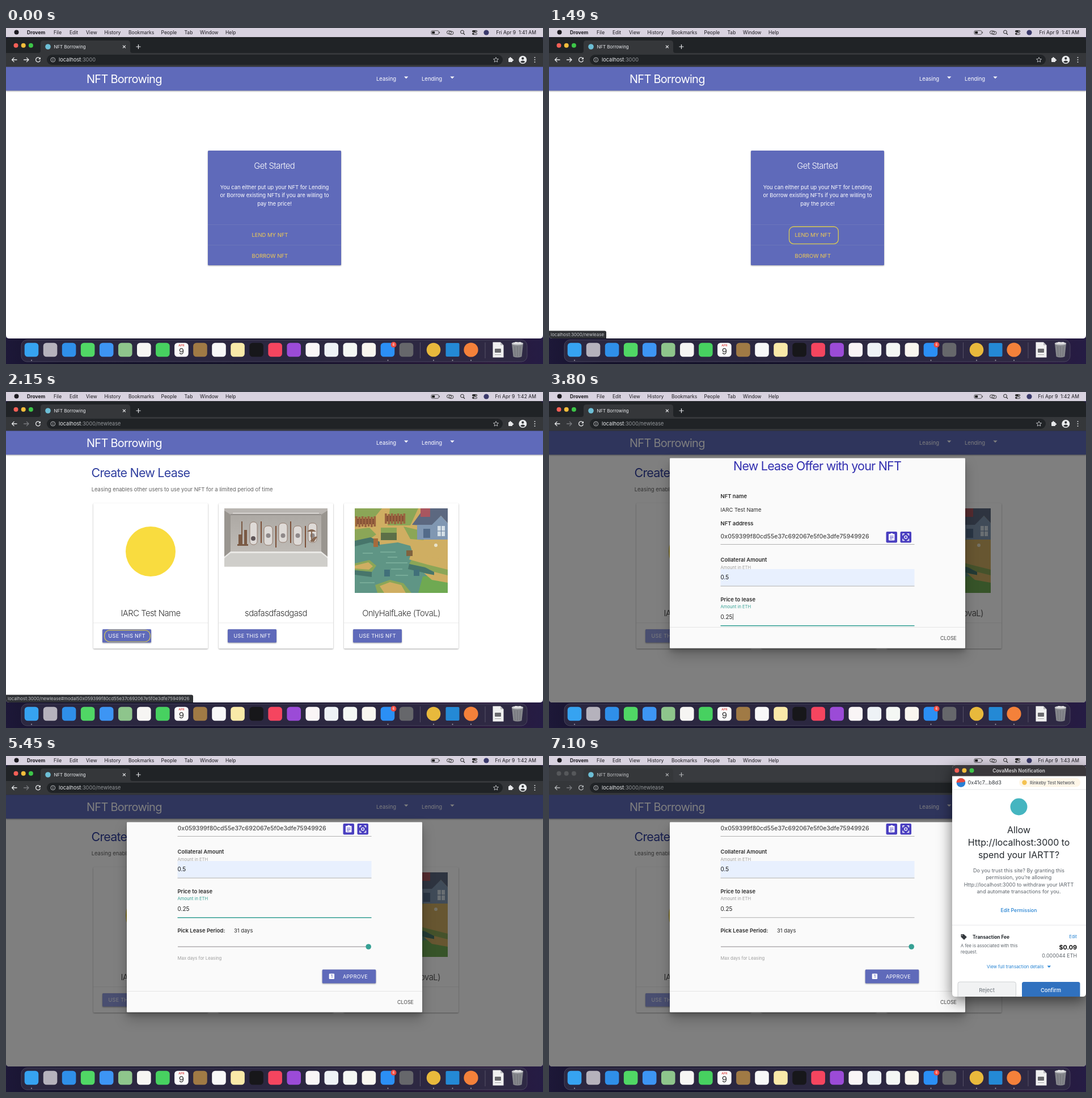
Animation, 947 px wide and 592 px high, one loop 8 s. Source, as an HTML page:

```html
<!DOCTYPE html>
<html lang="en">
<head>
<meta charset="utf-8">
<title>NFT Borrowing</title>
<style>
html, body { margin: 0; width: 100%; height: 100%; overflow: hidden; background: #120f26; }
svg { display: block; width: 947px; height: 592px; }
text { font-family: Inter, "Open Sans", sans-serif; white-space: pre; }
.lift { filter: drop-shadow(0 1px 1.2px rgba(0,0,0,.36)); }
.float { filter: drop-shadow(0 6px 3px rgba(0,0,0,.12)) drop-shadow(0 11px 11px rgba(0,0,0,.24)); }
.window { filter: drop-shadow(0 8px 13px rgba(0,0,0,.55)); }
</style>
</head>
<body>
<svg id="stage" viewBox="0 0 947 592"></svg>
<script>
const stage = document.getElementById('stage');
const INDIGO = '#5f6aba', YELLOW = '#f2cc52', RING = '#dacb50', TEAL = '#35a094', INK = '#2b2b2b';
const CUTS = [500, 2150, 3800, 5450, 7100], LOOP = 8000;
const TOKEN = '0x059399f80cd55e37c692067e5f0e3dfe75949926';

// y is the middle of the capitals
const text = (x, y, s, size, fill, more = '') =>
  `<text x="${x}" y="${y + size * .36}" font-size="${size}" fill="${fill}" ${more}>${s}</text>`;
const MID = 'text-anchor="middle" ', END = 'text-anchor="end" ', BOLD = 'font-weight="600"', MED = 'font-weight="500"';
const HEAD = 'letter-spacing="-.8"', SUB = 'letter-spacing="-.5" font-weight="300"';
const rect = (x, y, w, h, fill, r = 0, more = '') =>
  `<rect x="${x}" y="${y}" width="${w}" height="${h}" rx="${r}" fill="${fill}" ${more}/>`;
const dot = (x, y, r, fill, more = '') => `<circle cx="${x}" cy="${y}" r="${r}" fill="${fill}" ${more}/>`;
const path = (d, fill, more = '') => `<path d="${d}" fill="${fill}" ${more}/>`;
const line = (d, stroke, w = 1, more = '') => path(d, 'none', `stroke="${stroke}" stroke-width="${w}" ${more}`);
const group = (s, more = '') => `<g ${more}>${s}</g>`;
const lights = (x, y, gap, cols) => cols.map((c, i) => dot(x + i * gap, y, 4, c)).join('');
const LIGHTS = ['#f45f56', '#f6bd3b', '#3dc648'];

const DEFS = `<defs>
<linearGradient id="desk"><stop stop-color="#1d1838"/><stop offset=".1" stop-color="#14112a"/><stop offset=".5" stop-color="#15122b"/><stop offset=".9" stop-color="#2a1a3c"/><stop offset="1" stop-color="#251c44"/></linearGradient>
<linearGradient id="wall" x2="0" y2="1"><stop stop-color="#aaa6a1"/><stop offset="1" stop-color="#c6c2bd"/></linearGradient>
<clipPath id="page"><path d="M0 68H947V541Q947 547 941 547H6Q0 547 0 541Z"/></clipPath>
<clipPath id="scroll"><path d="M213 116.5H734V414H213Z"/></clipPath>
<clipPath id="art"><path d="M0 0H164V149H0Z"/></clipPath>
<clipPath id="pop"><path d="M711 22Q711 16 717 16H941Q947 16 947 22V418Q947 424 941 424H717Q711 424 711 418Z"/></clipPath>
<clipPath id="face"><circle cx="726.5" cy="47" r="8"/></clipPath>
</defs>`;

function menuBar(clock) {
  const items = [[84, 'File'], [112, 'Edit'], [141, 'View'], [173.5, 'History'], [216, 'Bookmarks'],
    [273.5, 'People'], [314.5, 'Tab'], [342, 'Window'], [387, 'Help']];
  return rect(0, 0, 947, 16, '#d8d2df') + dot(18.5, 7.5, 4, '#1c1a20')
    + text(37, 8, 'Drovem', 8.5, '#1c1a20', 'font-weight="700"')
    + items.map(([x, s]) => text(x, 8, s, 8.5, '#1c1a20')).join('')
    + rect(750, 4.7, 13, 6.6, 'none', 1.8, 'stroke="#333" stroke-width=".8"') + rect(751.2, 6, 5, 4, '#222', .8) + rect(764, 6.7, 1, 2.6, '#444')
    + rect(777.5, 5, 8, 5.4, 'none', 2.7, 'stroke="#333"') + rect(781, 6, 8, 5.4, 'none', 2.7, 'stroke="#333"')
    + dot(804.5, 7, 2.9, 'none', 'stroke="#222"') + line('M806.6 9.2L809 11.8', '#222', 1.2)
    + rect(822, 4, 9, 3.4, '#222', 1.7) + dot(828.8, 5.7, 1, '#d8d2df') + rect(822.4, 8.8, 8.2, 2.8, 'none', 1.4, 'stroke="#222" stroke-width=".8"') + dot(824, 10.2, 1.2, '#222')
    + dot(847, 8, 4.6, '#3b3a6c')
    + text(935, 8, `Fri Apr 9\u00a0 ${clock}`, 8.6, '#1c1a20', END);
}

function browser(url, forward, active) {
  const pale = active ? '#e6e7e9' : '#b4b6b9', arrow = 'stroke-linecap="round" stroke-linejoin="round"';
  return path('M0 68.3V22Q0 16 6 16H941Q947 16 947 22V68.3Z', active ? '#202326' : '#393b3f')
    + path('M57 44Q61 44 61 40V27Q61 22 66 22H214Q219 22 219 27V40Q219 44 223 44H947V68.3H0V44Z', '#35373a')
    + lights(17.5, 30.8, 13.2, active ? LIGHTS : Array(3).fill('#56585b'))
    + dot(74, 33, 4.8, '#6dbfd6') + text(84.5, 33, 'NFT Borrowing', 7.9, active ? '#e8eaed' : '#c2c4c7')
    + line('M206 30.6l4.8 4.8m0-4.8l-4.8 4.8', pale, 1.2) + line('M229.5 33h8m-4-4v8', pale, 1.2)
    + line('M19 56H10.5m3.6-3.6l-3.6 3.6 3.6 3.6', pale, 1.3, arrow)
    + line('M31.5 56H40m-3.6-3.6l3.6 3.6-3.6 3.6', forward ? pale : '#797b7f', 1.3, arrow)
    + line('M60 53.8A4 4 0 1 0 60.4 57', pale, 1.3) + path('M61 51.4v3.8h-3.8z', pale)
    + rect(72, 47, 804, 18, '#202326', 9)
    + dot(82.8, 56, 3.9, 'none', 'stroke="#c9cbce" stroke-width=".9"') + line('M82.8 55.4v2.8M82.8 53.6v1', '#c9cbce', 1)
    + text(93, 56, `localhost<tspan fill="#94979b">:3000${url}</tspan>`, 9.2, '#e8eaed')
    + path('M864 51.6l1.3 2.9 3.2.3-2.4 2.1.7 3.1-2.8-1.6-2.8 1.6.7-3.1-2.4-2.1 3.2-.3z', 'none', 'stroke="#c9cbce" stroke-width=".9"')
    + rect(886, 53, 7, 7, '#e6e7e9', 1) + dot(889.4, 52.8, 1.6, '#e6e7e9') + dot(893.4, 56.5, 1.6, '#e6e7e9')
    + dot(911.3, 56, 7, '#eceef0') + dot(911.3, 53.7, 2.1, '#35373a') + path('M907 59.4q4.3-4 8.6 0-4.3 4-8.6 0z', '#35373a')
    + [52, 56, 60].map(y => dot(932.5, y, 1, '#dcdddf')).join('');
}

function dock() {
  const cols = ['#36a3f1', '#b5b2bc', '#2f8fe9', '#50d765', '#3d95f4', '#8ec58c', '#f6f5f3', '#47d160', '#fafafa', '#a07a45',
    '#f8f8f8', '#f9e9a8', '#17171a', '#f5455f', '#9b4bd7', '#f9f5f6', '#eef2f6', '#f4f7f4', '#f9f6ef', '#2b8ff5', '#66676b'];
  const at = i => 45 + i * 33.05;
  return rect(27, 549.5, 892, 38.5, '#302d45', 10, 'fill-opacity=".82" stroke="#57536b" stroke-width=".7"')
    + cols.map((c, i) => rect(at(i) - 12.3, 554.7, 24.6, 24.6, c, 5.6)).join('')
    + text(at(8), 559, 'APR', 5, '#dc4a45', MID + BOLD) + text(at(8), 569.5, '9', 15, '#333', MID)
    + dot(683.5, 558, 5, '#ee4b42') + text(683.5, 558, '6', 6.5, '#fff', MID)
    + line('M730.5 554V582M845 554V582', '#605c70', .8)
    + dot(754, 567, 12.3, '#e8b93c') + rect(775.5, 555, 24, 24, '#2489d5', 2) + dot(820, 567, 12.6, '#f4813a')
    + path('M858.5 553.5H872L877.5 559V580.5H858.5Z', '#f0f0f0') + path('M872 553.5V559H877.5Z', '#bdbdc0')
    + rect(862, 565, 11, 7, '#6a6a6e', 1) + line('M862 575.5h11', '#a8a8aa')
    + path('M892 556H912L909.5 579Q902 582 894.5 579Z', '#85878c') + `<ellipse cx="902" cy="556" rx="10.3" ry="2.8" fill="#c8c9cc"/>`
    + path('M895 556l4-3 4 2 4-2 2 3z', '#f0f0f0') + line('M897 561l1 17M902 561v18M907 561l-1 17', '#696b70', .8)
    + [45, 673.5, 754, 787.5, 820].map(x => dot(x, 585.6, 1, '#aaa7b4')).join('');
}

const nav = () => group(rect(0, 68, 947, 42.4, INDIGO), 'class="lift"')
  + text(142, 89.5, 'NFT Borrowing', 20, '#fff', 'letter-spacing="-.75"')
  + text(653, 90, 'Leasing', 9.5, '#fff') + text(733, 90, 'Lending', 9.5, '#fff')
  + path('M702 85.6h7.4l-3.7 3.7zM783.3 85.6h7.4l-3.7 3.7z', '#fff');

const home = focus => group(rect(356, 216, 235, 202, INDIGO, 1.5), 'class="lift"')
  + text(473.3, 242.5, 'Get Started', 14.8, '#fff', MID + SUB)
  + ['You can either put up your NFT for Lending', 'or Borrow existing NFTs if you are willing to', 'pay the price!']
    .map((s, i) => text(473.5, 280.3 + i * 14.5, s, 9.4, '#fff', MID)).join('')
  + line('M356 346.5H591M356 382.5H591', '#6f78bb', .8)
  + text(433.5, 365, 'LEND MY NFT', 9.45, YELLOW) + text(433.5, 401.3, 'BORROW NFT', 9.45, YELLOW)
  + (focus ? rect(423.5, 350, 86.8, 30.3, 'none', 8, `stroke="${RING}" stroke-width="1.3"`) : '');

const button = (x, y, w, h, fill = INDIGO) => group(rect(x, y, w, h, fill, 1.5), 'class="lift"');

function gallery() {
  const rail = [451, 477, 503, 529];
  return rect(385, 205, 182, 102.5, 'url(#wall)') + path('M385 205H567V209L556 216H396L385 209Z', '#b9b5b1')
    + line('M396 216H556', '#8b8783', 1.5) + line('M400 213.5H552', '#eeebe8', 1.2)
    + path('M385 209L396 216V282L385 292ZM567 209L556 216V282L567 292Z', '#99958f')
    + path('M396 282H556L567 292V307.5H385V292Z', '#cfceca') + path('M385 290L396 281H556L567 290V293L556 284H396L385 293Z', '#e9e8e5')
    + rail.map((x, i) => rect(x - 2, 228 + i % 2 * 8, 2, 38, '#7c4f37') + rect(x + 4, 236 - i % 2 * 5, 15, 34, '#dedad7', 6, 'stroke="#85695a" stroke-width=".8"')
      + dot(x + 11.5, 253, 4, '#8f898a')).join('')
    + rect(430, 229, 13, 40, '#dedad7', 6, 'stroke="#85695a" stroke-width=".8"') + dot(436, 258, 4, '#5e5558')
    + path('M408 268h19v3h-19zM410 251h7v17h-7zM420 243h5v25h-5zM415 228h2v23h-2z', '#7a5a45')
    + path('M531 246q8-8 16 0zM536 263q7-10 13-8l-6 9zM538 246h2v18h-2z', '#866752');
}

function village() {
  const grass = '#8ba657', sand = '#cfae62', water = '#5f9585';
  const fence = (x, y) => rect(x, y + 4, 36, 10, '#7c4a33')
    + [...Array(7)].map((_, i) => rect(x + i * 5.4, y + i % 2, 3.8, 18, '#9a6440')).join('');
  return group(rect(0, 0, 164, 149, sand)
    + path('M0 0H48L34 17H0ZM62 0H112L98 30H58ZM0 37L26 34 38 46 22 57H0ZM86 32L112 38 122 56 98 54Z', grass)
    + path('M0 62L28 56 44 64 76 60 98 66 104 84 126 92 132 112 116 149H0Z', water)
    + path('M104 84L126 92 164 96V118L140 112 124 104 96 98Z', grass) + path('M100 78L164 92V108L128 99 96 90Z', sand)
    + path('M0 97L26 91 38 101 30 112 0 109Z', grass) + path('M0 101L24 95 32 102 25 108 0 106Z', sand)
    + path('M0 109L30 112V121L0 117ZM96 98L124 104 140 112V120L120 113 94 107ZM0 57L28 51 44 59V66L28 60 0 67Z', '#47756b')
    + path('M36 135L62 126 86 132 100 149H40Z', grass) + path('M44 137L62 130 82 135 90 149H52Z', sand)
    + path('M120 120L142 118 164 128V149H112Z', '#6fa952') + path('M122 114L164 122V131L136 126Z', sand)
    + line('M45 77h27M55 96h38M9 131h26M72 118h22M58 86h17M14 79h18M64 107h20', '#80b29f', 1.6)
    + fence(1, 14) + fence(53, 9) + rect(46, 34, 28, 9, grass) + rect(46, 43, 28, 13, '#5c6f48')
    + rect(52, 108, 10, 12, '#41707a') + rect(104, 108, 10, 11, '#41707a') + rect(33, 53, 8, 15, '#a56b3d') + rect(91, 74, 11, 10, '#80633f')
    + path('M101 29L122 0H164V26L152 13 136 31Z', '#5c6880') + path('M110 29H136L152 13 164 26V55H110Z', '#8097b2')
    + rect(116, 0, 17, 15, '#a9565f') + rect(121, 36, 12, 16, '#536b8a') + rect(146, 31, 13, 18, '#d3dee6') + line('M152.5 31v18M146 40h13', '#60799a')
    + dot(143, 65, 3, '#e8e2c9'), 'transform="translate(615 205)" clip-path="url(#art)"');
}

function lease(live) {
  const names = ['IARC Test Name', 'sdafasdfasdgasd', 'OnlyHalfLake (TovaL)'];
  return text(150.5, 142.5, 'Create New Lease', 21.5, '#303f9f', HEAD)
    + text(150.7, 171.5, 'Leasing enables other users to use your NFT for a limited period of time', 9.45, '#616161')
    + names.map((s, i) => {
      const x = 154 + i * 221;
      return group(rect(x, 196, 202, 256, '#fff', 1.5), 'class="lift"') + line(`M${x} 406.8h202`, '#e8e8e8', .8)
        + text(x + 101, 390, s, 14.8, '#333', MID + SUB) + button(x + 16, 418, 86, 23.5, live ? INDIGO : '#949ee2')
        + text(x + 26.5, 429.8, 'USE THIS NFT', 9, '#fff', 'letter-spacing=".33"');
    }).join('')
    + dot(255, 281, 44, '#f9dc3f') + gallery() + village()
    + (live ? rect(173.7, 419.7, 80.6, 20.3, 'none', 9, `stroke="${RING}" stroke-width="1.2"`) : '');
}

// Form rows are placed unscrolled and shifted up by `top`
function modal(top, focused, caret) {
  const tone = focused ? TEAL : '#9e9e9e';
  const rows = text(473, 130.5, 'New Lease Offer with your NFT', 21.5, '#3330b0', MID + HEAD)
    + [[183.5, 'NFT name'], [232, 'NFT address'], [295.3, 'Collateral Amount'], [365.2, 'Price to lease'], [434.8, 'Pick Lease Period:']]
      .map(([y, s]) => text(302.5, y, s, 9.45, INK, BOLD)).join('')
    + text(302.5, 208, 'IARC Test Name', 9.4, INK) + text(302.5, 253.8, TOKEN, 10.5, '#4a4a4a', MED)
    + line('M302.5 268.5H644.5', '#9e9e9e', .8)
    + rect(594.5, 246, 19.5, 19.5, '#4a3fc0', 2) + rect(619.5, 246, 19.5, 19.5, '#4a3fc0', 2)
    + rect(599, 250, 10.5, 11.5, '#fff', 1) + rect(602.3, 248.7, 4, 3, '#fff', 1.2) + line('M601 254h6.5M601 256.5h6.5M601 259h4.5', '#4a3fc0')
    + line('M624 253v-3h3M631.5 250h3v3M634.5 258.5v3h-3M627 261.5h-3v-3', '#fff', 1.4) + dot(629.2, 255.8, 2.4, 'none', 'stroke="#fff" stroke-width="1.3"')
    + text(302.5, 308.8, 'Amount in ETH', 7.6, '#9e9e9e') + rect(302.5, 312, 342, 29.5, '#e8f0fe') + line('M302.5 342H644.5', '#9e9e9e', .8)
    + text(302.5, 326.8, '0.5', 10, '#111') + text(302.5, 378.6, 'Amount in ETH', 7.6, tone)
    + text(302.5, 396.4, '0.25', 10, '#222') + line('M302.5 411.7H644.5', tone, focused ? 1.5 : .8)
    + (caret ? line('M324.5 390.5v11', '#222', .8) : '')
    + text(402, 434.8, '31 days', 9.4, INK) + rect(303, 462, 336, 2, '#c2c0c2') + dot(639.2, 463, 4.8, TEAL)
    + text(302.5, 482.8, 'Max days for Leasing', 7.7, '#9e9e9e')
    + button(557.7, 503.2, 94.6, 24.3) + rect(569.7, 510.6, 9.4, 9.4, '#fff', 1.2) + text(574.4, 515.3, '1', 7, INDIGO, MID + BOLD)
    + text(594, 515.3, 'APPROVE', 9, '#fff', 'letter-spacing=".33"');
  return group(rect(213, 116.5, 521, 335, '#fafafa', 1.3), 'class="float"')
    + group(group(rows, `transform="translate(0 ${-top})"`), 'clip-path="url(#scroll)"')
    + line('M213 414.5H734', '#e0e0e0', .8) + text(690, 434.3, 'CLOSE', 8.8, '#444');
}

function wallet() {
  const blue = '#2482d2', gray = '#5d646b';
  const rows = (y, gap, size, fill, list) => list.map((s, i) => text(828.5, y + i * gap, s, size, fill, MID)).join('');
  const inside = rect(711, 16, 236, 408, '#fff') + rect(711, 16, 236, 19.5, '#39373b')
    + lights(719.3, 25.6, 13.1, LIGHTS) + text(828.5, 25.6, 'CovaMesh Notification', 8.4, '#d8d7d9', MID + BOLD)
    + group(dot(726.5, 47, 8, '#2b7fd4') + path('M716 47L723 37 738 41 732 46Z', '#e94a3f'), 'clip-path="url(#face)"')
    + text(738.5, 47, '0x41c7...b8d3', 9.05, '#30353a')
    + rect(829, 39, 108, 15.5, '#fef6e8', 7.7) + dot(838.5, 46.8, 4.2, '#f4c251') + text(848, 46.8, 'Rinkeby Test Network', 7.55, '#555b61', MED)
    + line('M711 59H947M711 298H947', '#dfe1e3', .8) + dot(828.5, 89.5, 15, '#45b5c0')
    + rows(130.5, 21.8, 15.9, '#24292e', ['Allow', 'Http://localhost:3000 to', 'spend your IARTT?'])
    + rows(201.5, 12.5, 9, gray, ['Do you trust this site? By granting this', 'permission, you’re allowing', 'Http://localhost:3000 to withdraw your IARTT', 'and automate transactions for you.'])
    + text(828.5, 272, 'Edit Permission', 8.7, blue, MID + MED)
    + path('M726.5 314h5l5.3 5-4.8 5-5.5-5.2z', '#33383d') + dot(728.6, 316, .8, '#fff')
    + text(747, 318.5, 'Transaction Fee', 8.35, '#24292e', 'font-weight="700"') + text(931, 318.5, 'Edit', 7.7, blue, END)
    + text(726, 334.5, 'A fee is associated with this', 7.65, gray) + text(726, 344.8, 'request.', 7.65, gray)
    + text(931, 337.3, '$0.09', 10.8, '#111', END + 'font-weight="700"') + text(931, 351.5, '0.000044 ETH', 8.9, gray, END)
    + text(772, 371.2, 'View full transaction details', 7.75, blue) + path('M878.5 369.5h6.6l-3.3 3.6z', blue)
    + rect(721, 398, 102.5, 32, '#f1f2f3', 3.5, 'stroke="#c9cccf" stroke-width=".9"') + text(772, 412.3, 'Reject', 9.3, '#7d8389', MID + MED)
    + rect(834, 398, 102.5, 32, '#3071bf', 3.5) + text(885, 412.3, 'Confirm', 9.3, '#fff', MID + MED);
  return group(group(inside, 'clip-path="url(#pop)"'), 'class="window"');
}

const status = (w, s) => path(`M0 533.5H${w - 3}Q${w} 533.5 ${w} 536.5V547H0Z`, '#303236') + text(3, 540.5, s, 7.9, '#c6c8cb');

function scene(n) {
  const dim = n > 2;
  const page = rect(0, 68, 947, 479, '#fff') + (n < 2 ? home(n === 1) : lease(n === 2)) + nav()
    + (dim ? rect(0, 68, 947, 479, '#000', 0, 'opacity=".5"') + modal(n === 3 ? 0 : 127, n < 5, n === 3) : '')
    + (n === 1 ? status(101, 'localhost:3000/newlease') : '')
    + (n === 2 ? status(330, 'localhost:3000/newlease#modal5' + TOKEN) : '');
  return DEFS + rect(0, 0, 947, 592, 'url(#desk)') + menuBar(['1:41 AM', '1:42 AM', '1:43 AM'][n < 2 ? 0 : n < 5 ? 1 : 2])
    + group(page, 'clip-path="url(#page)"') + browser(n < 2 ? '' : '/newlease', n < 2, n < 5) + dock() + (n === 5 ? wallet() : '');
}

let shown = -1;
const start = performance.now();
function tick() {
  const t = (performance.now() - start) % LOOP;
  const n = CUTS.filter(c => t >= c).length;
  if (n !== shown) stage.innerHTML = scene(shown = n);
  requestAnimationFrame(tick);
}
tick();
</script>
</body>
</html>
```
